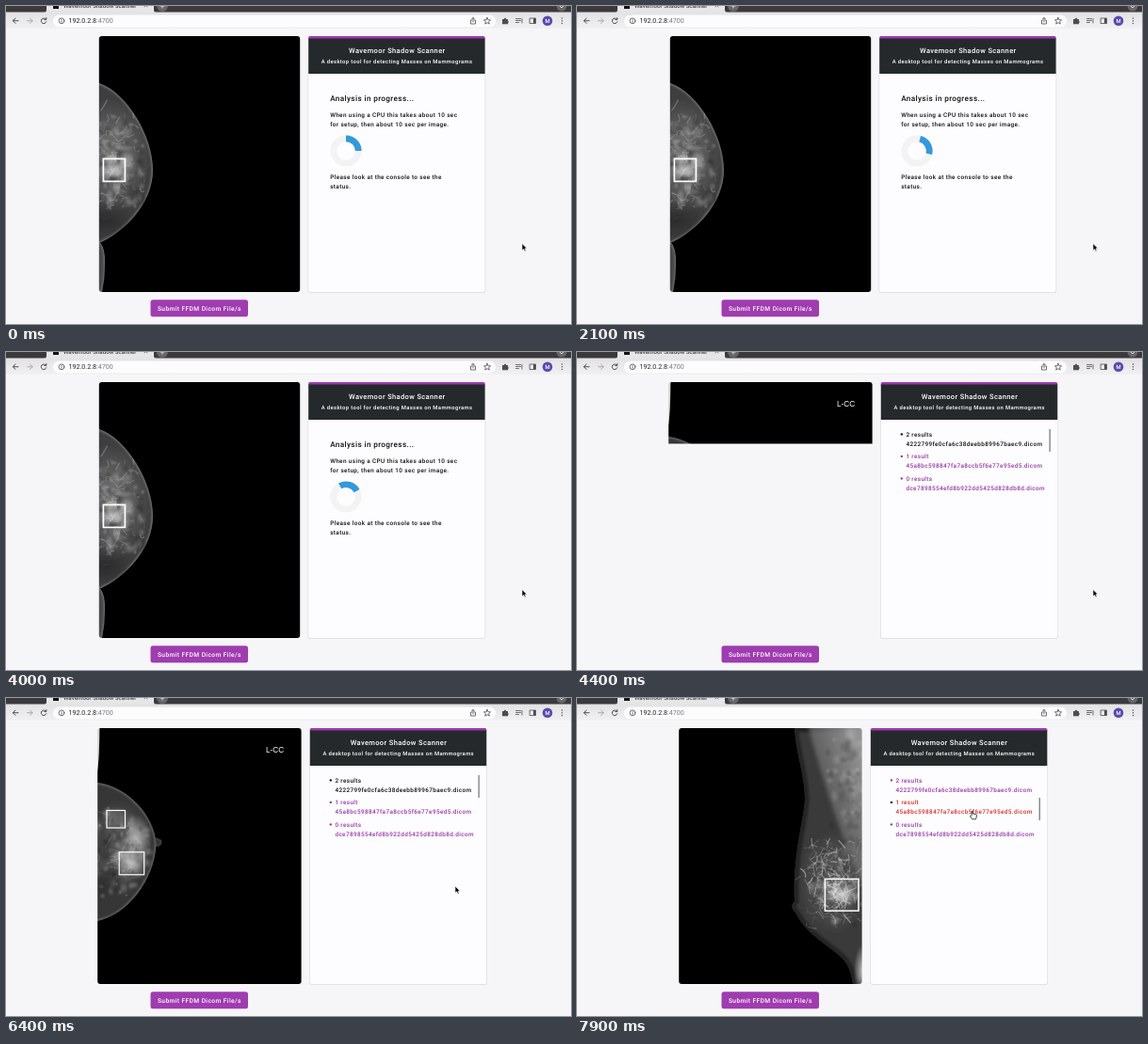
These frames come from a looping animation (600x338 px, 8000 ms). An HTML page with a canvas:

```html
<!DOCTYPE html>
<html lang="en">
<head>
<meta charset="utf-8">
<title>Tissue scan results</title>
<style>
  html, body { margin: 0; width: 600px; height: 338px; overflow: hidden; background: #f6f5f8; }
  canvas, svg { position: absolute; left: 0; top: 0; display: block; }
  text { font: 500 6.4px Roboto, sans-serif; letter-spacing: .37px; text-rendering: geometricPrecision; white-space: pre; }
  .mid { text-anchor: middle; fill: #fff; }
  .line { fill: none; stroke: #4c4e52; stroke-width: 1; stroke-linecap: round; stroke-linejoin: round; }
</style>
</head>
<body>
<canvas id="view" width="600" height="338"></canvas>
<svg width="600" height="338" viewBox="0 0 600 338">
  <!-- browser bar -->
  <linearGradient id="shade" x2="0" y2="1">
    <stop stop-color="#e2e1e4"/><stop offset="1" stop-color="#f1f0f3"/>
  </linearGradient>
  <rect width="600" height="7" fill="#3b393c"/>
  <path d="M40 7q3 0 3-3V0H157V4q0 3 3 3Z" fill="#e6e5e8"/>
  <rect y="6.5" width="600" height="17.5" fill="url(#shade)"/>
  <rect x="50" y="9.5" width="470" height="13" rx="6.5" fill="#fcfcfd"/>
  <rect x="50" y="-3" width="6" height="6" fill="#111"/>
  <text x="61" y="1.8" style="font-size:6.2px;letter-spacing:0" fill="#444">Wavemoor Shadow Scanner</text>
  <path class="line" d="M147-2l3 3m0-3l-3 3" style="stroke-width:.7"/>
  <circle cx="166" cy="0" r="6" fill="#68666a"/>
  <path d="M163.5 0h5M166-2.5v5" stroke="#ddd"/>
  <circle cx="590" cy="0" r="5.5" fill="#68666a"/>
  <path d="M588 0l2 2 2-2" stroke="#ddd" fill="none"/>
  <path class="line" d="M13 15.7H7.5m2.5-2.7-2.7 2.7 2.7 2.7"/>
  <path class="line" d="M22.5 15.7H28m-2.5-2.7 2.7 2.7-2.7 2.7" style="stroke:#a9abae"/>
  <path class="line" d="M42.3 14a2.8 2.8 0 1 0 .5 2.7M42.8 12.5v2h-2"/>
  <circle class="line" cx="59" cy="15.8" r="2.9" style="stroke-width:.8"/>
  <path class="line" d="M59 15.6v1.6M59 14.2v.1" style="stroke-width:.8"/>
  <text x="66.5" y="18.3" style="font-size:7.1px;font-weight:400;letter-spacing:0" fill="#222">192.0.2.8<tspan fill="#74777b">:4700</tspan></text>
  <g class="line" style="stroke-width:.8">
    <path d="M494.8 15h-1.3v4h5v-4h-1.3M496 17v-4.5m-1.3 1.2 1.3-1.3 1.3 1.3"/>
    <path d="M511 12.3l1 2.4 2.6.2-2 1.7.7 2.5-2.3-1.4-2.3 1.4.7-2.5-2-1.7 2.6-.2Z"/>
    <path d="M541.5 13.5h5m-5 2h5m-5 2h3M548 18v-4.5"/>
    <rect x="556.5" y="13" width="6" height="5.5"/>
  </g>
  <path d="M527 14h1.8a1.2 1.2 0 0 1 2.4 0h1.8v1.8a1.2 1.2 0 0 1 0 2.2v1.2h-6Z" fill="#4c4e52"/>
  <rect x="560" y="13" width="2.5" height="5.5" fill="#4c4e52"/>
  <circle cx="575" cy="15.8" r="5.3" fill="#5b4aad"/>
  <text class="mid" x="575" y="17.9" style="font-size:5.8px;letter-spacing:0">M</text>
  <path d="M590.5 13v.1m0 2.6v.1m0 2.6v.1" stroke="#4c4e52" stroke-width="1.4" stroke-linecap="round"/>

  <!-- result card, drawn at its progress position -->
  <g id="card">
    <rect x="320.6" y="32.5" width="188.6" height="272.2" rx="2" fill="#dddbe0"/>
    <rect x="321.2" y="32" width="187.4" height="272" rx="2" fill="#fdfcfe"/>
    <rect x="321.2" y="34" width="187.4" height="38" fill="#25292c"/>
    <path d="M321.2 34.5V33.5q0-1.5 1.5-1.5H507q1.6 0 1.6 1.5v1Z" fill="#9d39af"/>
    <text class="mid" x="415.3" y="50.2" style="font-size:7.5px">Wavemoor Shadow Scanner</text>
    <text class="mid" x="415.1" y="61.2" style="font-size:5.85px">A desktop tool for detecting Masses on Mammograms</text>
    <g id="progress" fill="#111">
      <text x="344.2" y="101" style="font-size:8.2px">Analysis in progress...</text>
      <text x="344.2" y="118.3">When using a CPU this takes about 10 sec</text>
      <text x="344.2" y="128.2">for setup, then about 10 sec per image.</text>
      <g fill="none" stroke-width="6.7">
        <circle cx="361" cy="154" r="13.2" stroke="#f3f3f3"/>
        <circle id="arc" cx="361" cy="154" r="13.2" stroke="#3498db" pathLength="360" stroke-dasharray="90 270"/>
      </g>
      <text x="344.2" y="184.2">Please look at the console to see the</text>
      <text x="344.2" y="194">status.</text>
    </g>
    <g id="results"></g>
  </g>

  <rect x="153.5" y="312.3" width="103.5" height="18" rx="2.5" fill="#9f3cb0"/>
  <text class="mid" x="205.4" y="323.7" style="font-size:6.65px;letter-spacing:.4px">Submit FFDM Dicom File/s</text>

  <path id="arrow" d="M0 0V7.2L1.7 5.7 2.9 8.3 4.1 7.8 3 5.2H5.2Z" fill="#000" stroke="#fff" stroke-width=".6"/>
  <path id="hand" d="M-.7 4.5V.7q.7-1 1.4 0V3l3 .7q.8.3.7 1.3L4 7.5 3.3 8.8H-.2L-2.5 5.6q.2-1 1.1-.6Z" fill="#fff" stroke="#111" stroke-width=".8"/>
</svg>
<script>
const $ = id => document.getElementById(id);
const ctx = $('view').getContext('2d');
const LOOP = 8000, RESULTS = 4400, LOADED = 4500, CLICKED = 7500;
const BLACK = '#111', PURPLE = '#973aa8', RED = '#dc2c2c';

let seed = 7;
const rnd = () => (seed = seed * 16807 % 2147483647) / 2147483647;
const spread = () => rnd() + rnd() - 1;

// One scan: a black plate with clipped, softly mottled tissue.
function scan(draw) {
  const c = document.createElement('canvas');
  c.width = 600; c.height = 338;
  const g = c.getContext('2d');
  g.fillRect(0, 0, 600, 338);
  draw(g);
  return c;
}

function glow(g, x, y, rx, ry, tone, alpha) {
  g.save();
  g.translate(x, y);
  g.scale(rx, ry);
  const f = g.createRadialGradient(0, 0, 0, 0, 0, 1);
  f.addColorStop(0, `rgba(${tone},${tone},${tone},${alpha})`);
  f.addColorStop(1, `rgba(${tone},${tone},${tone},0)`);
  g.fillStyle = f;
  g.fillRect(-1, -1, 2, 2);
  g.restore();
}

function mottle(g, n, x, y, rx, ry, alpha) {
  for (let i = 0; i < n; i++) {
    const r = 2 + rnd() * 5;
    glow(g, x + spread() * rx, y + spread() * ry, r, r * (.6 + rnd()), i % 2 ? 215 : 20, alpha);
  }
}

function wisps(g, n, x, y, rx, ry, alpha) {
  g.filter = 'blur(.7px)';
  for (let i = 0; i < n; i++) {
    const a = x + spread() * rx, b = y + spread() * ry, l = 4 + rnd() * 9, d = rnd() * 6.28;
    g.strokeStyle = `rgba(225,225,225,${alpha * rnd()})`;
    g.lineWidth = .5 + rnd();
    g.beginPath();
    g.moveTo(a, b);
    g.quadraticCurveTo(a + spread() * 8, b + spread() * 8, a + l * Math.cos(d), b + l * Math.sin(d));
    g.stroke();
  }
  g.filter = 'none';
}

function tissue(g, d, base, rim, rimWidth, inside) {
  const p = new Path2D(d);
  g.save();
  g.clip(p);
  g.fillStyle = base;
  g.fillRect(0, 0, 600, 338);
  g.strokeStyle = rim;
  g.lineWidth = rimWidth;
  g.filter = 'blur(.8px)';
  g.stroke(p);
  g.filter = 'none';
  inside();
  g.restore();
}

function box(g, x, y, w, h, line) {
  g.strokeStyle = '#fff';
  g.lineWidth = line;
  g.strokeRect(x, y, w, h);
}

const first = scan(g => {
  tissue(g, 'M90 250H99Q106 258 105 275Q105 290 102 304H90Z', '#484848', '#777', 2, () => {});
  tissue(g, 'M90 78L99 82C128 92 156 138 156 174C156 210 126 240 99 252H90Z', '#3e3e3e', '#777', 2.5, () => {
    glow(g, 112, 160, 42, 62, 165, .6);
    glow(g, 117, 170, 22, 24, 220, .4);
    mottle(g, 150, 118, 165, 32, 58, .25);
    wisps(g, 90, 116, 165, 34, 60, .3);
    glow(g, 106, 228, 32, 22, 15, .4);
    glow(g, 116, 173, 9, 10, 235, .5);
  });
  box(g, 103.4, 162.4, 23, 24, 1.7);
});

const second = scan(g => {
  tissue(g, 'M90 32H99.300Q99.300 62 97 78H90Z', '#d4d4d4', '#d4d4d4', 1, () => {});
  tissue(g, 'M152 149Q159 147 165 151Q167 156 161 158H153Z', '#333', '#444', 2, () => {});
  tissue(g, 'M90 89L97 90C130 94 158 126 159.500 155C158 194 128 231 97 237H90Z', '#363636', '#666', 3, () => {
    glow(g, 120, 160, 36, 52, 135, .6);
    glow(g, 138, 150, 17, 26, 225, .7);
    glow(g, 133, 176, 18, 20, 215, .6);
    glow(g, 117, 129, 15, 14, 200, .4);
    glow(g, 106, 157, 11, 16, 25, .5);
    mottle(g, 110, 122, 162, 35, 52, .25);
    wisps(g, 60, 124, 162, 34, 52, .25);
    glow(g, 105, 195, 20, 18, 25, .4);
    glow(g, 133, 176, 12, 11, 225, .5);
  });
  box(g, 107, 119.5, 19.5, 18.5, 1.2);
  box(g, 120.2, 163.8, 26.5, 24, 1.2);
  g.fillStyle = '#fff';
  g.font = '8.2px "Liberation Sans", Arial, sans-serif';
  g.fillText('L-CC', 276, 58);
});

const third = scan(g => {
  const skin = 'M231 32C233 62 242 82 242 108C241 130 229 165 231 216Q225 222 232 228C245 254 272 265 284 279Q291 288 293 304H310V32Z';
  tissue(g, skin, '#3a3a3a', '#242424', 9, () => {
    const f = g.createLinearGradient(246, 90, 306, 70);
    f.addColorStop(0, 'rgba(120,120,120,.4)');
    f.addColorStop(1, 'rgba(165,165,165,.85)');
    g.fillStyle = f;
    g.filter = 'blur(2px)';
    g.beginPath();
    g.moveTo(245, 28); g.lineTo(310, 28); g.lineTo(310, 215); g.quadraticCurveTo(270, 125, 245, 28);
    g.fill();
    g.filter = 'none';
    mottle(g, 60, 288, 100, 26, 75, .2);
    glow(g, 273, 196, 38, 55, 140, .5);
    mottle(g, 90, 272, 200, 32, 45, .25);
    wisps(g, 240, 270, 195, 34, 55, .5);
    glow(g, 282, 209, 17, 13, 235, .7);
    wisps(g, 30, 281, 209, 12, 10, .6);
    glow(g, 303, 290, 9, 28, 220, .8);
  });
  box(g, 263.4, 192.4, 35.6, 33.8, 1.5);
});

const files = [
  ['2 results', '4222799fe0cfa6c38deebb89967baec9'],
  ['1 result', '45a8bc598847fa7a8ccb5f6e77e95ed5'],
  ['0 results', 'dce7898554efd8b922dd5425d828db8d']
];
$('results').innerHTML = files.map(([count, id], i) => {
  const y = 89.6 + i * 23.5;
  return `<g><circle cx="343.2" cy="${y - 2.2}" r="1.2"/><g><text x="347.8" y="${y}">${count}</text>` +
    `<text x="347.8" y="${y + 10}">${id}.dicom</text></g></g>`;
}).join('') + '<rect id="bar" x="500" width="1" height="24" fill="#55585c"/>';
const items = [...$('results').children].slice(0, 3);

function plate(img, x, w, h) {
  ctx.save();
  ctx.beginPath();
  ctx.roundRect(x, 32, w, h, h < 272 ? [3, 3, 0, 0] : 3);
  ctx.clip();
  ctx.drawImage(img, 0, 0);
  ctx.restore();
}

const mix = (a, b, k) => a + (b - a) * Math.min(1, Math.max(0, k));

function pointer(t) {
  const a = Math.max(0, t - 5800) / 600, b = Math.max(0, t - 6400) / 600;
  if (t < 6400) return [mix(548, 477, a * a), mix(252.5, 200, a * a)];
  const k = 1 - (1 - Math.min(1, b)) ** 2;
  return [mix(477, 420, k), mix(200, 120, k)];
}

function draw(t) {
  const scene = t < RESULTS ? 0 : t < CLICKED ? 1 : 2;
  ctx.clearRect(0, 0, 600, 338);
  if (scene == 0) plate(first, 98.8, 213.4, 272);
  if (scene == 1) plate(second, 97.2, 216.4, t < LOADED ? 65.5 : 272);
  if (scene == 2) plate(third, 108.2, 194.4, 272);

  $('card').setAttribute('transform', `translate(${[0, 1.6, -9.3][scene]})`);
  $('progress').style.display = scene ? 'none' : '';
  $('results').style.display = scene ? '' : 'none';
  const turn = t < 2100 ? t * .178 : 374 + (t - 2100) * .167;
  $('arc').setAttribute('transform', `rotate(${turn - 90} 361 154)`);

  const [x, y] = pointer(t), hover = y < 126;
  items.forEach((item, i) => {
    const tone = i == scene - 1 ? BLACK : PURPLE;
    item.setAttribute('fill', tone);
    item.lastChild.setAttribute('fill', hover && i == 1 ? RED : tone);
  });
  $('bar').setAttribute('y', scene == 2 ? 106 : 82);
  for (const id of ['arrow', 'hand']) {
    $(id).setAttribute('transform', `translate(${x} ${y})`);
    $(id).style.display = hover == (id == 'hand') ? '' : 'none';
  }
}

function tick() {
  draw(Math.floor(performance.now() % LOOP / 100) * 100);
  requestAnimationFrame(tick);
}
tick();
</script>
</body>
</html>
```
